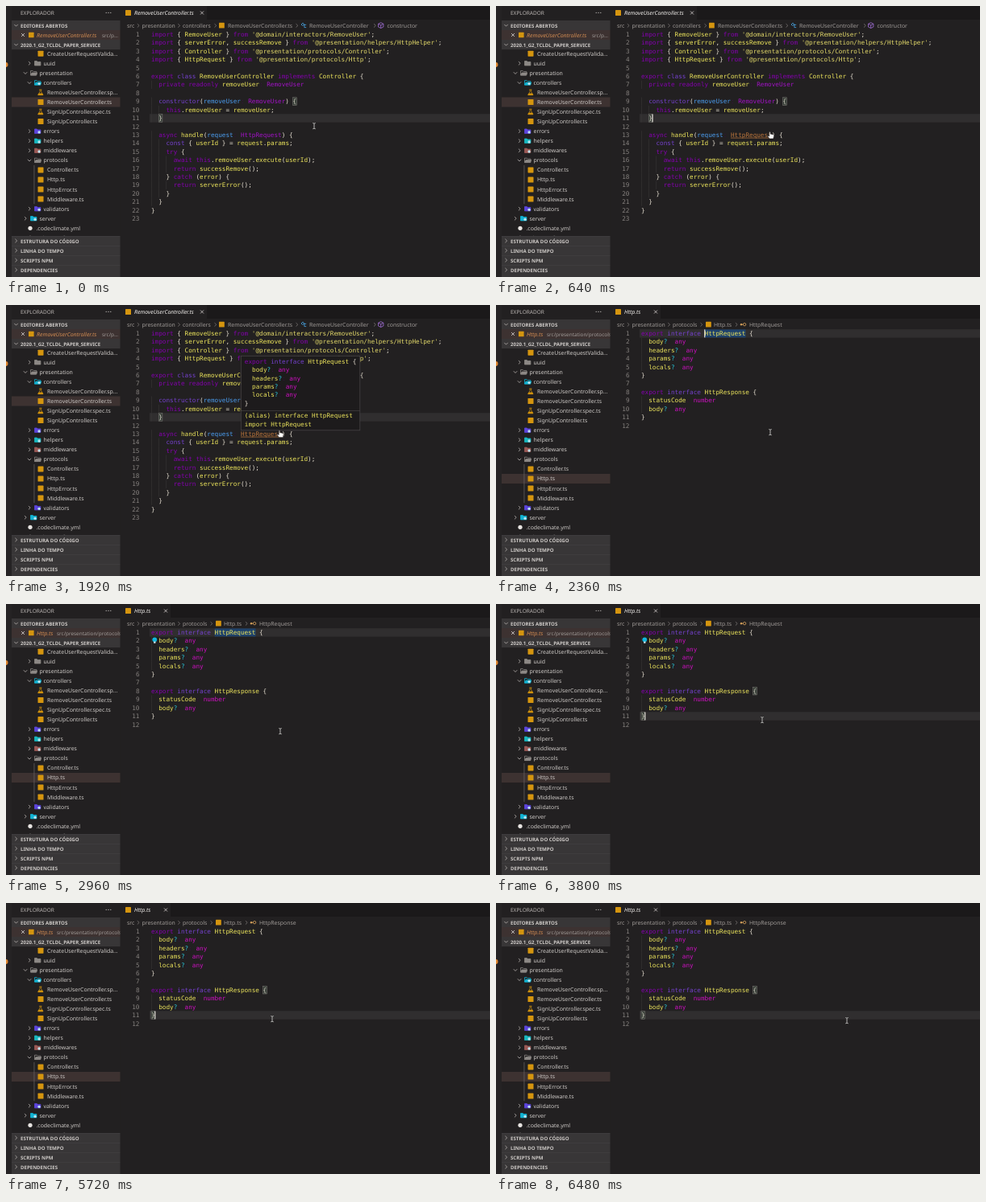
Write an HTML page that moves like this. It is 600 px wide and 337 px high and loops after 6520 ms.

```html
<!DOCTYPE html>
<html lang="pt">
<head>
<meta charset="utf-8">
<style>
html, body { margin: 0; width: 100%; height: 100%; overflow: hidden; background: #222021; }
svg { display: block; width: 600px; height: 337px; }
text { white-space: pre; text-rendering: geometricPrecision; }
.ui { font-family: "Noto Sans", "Open Sans", sans-serif; }
.code { font-family: "DejaVu Sans Mono", monospace; font-size: 7.68px; }
</style>
</head>
<body>
<svg id="stage" viewBox="0 0 600 337"></svg>
<script>
const LOOP = 6520;
const CHAR = 4.624, LINE = 10.41, LEFT = 180, TOP = 35.4;
const stage = document.getElementById('stage');

const C = {
  side: '#222021', strip: '#1b191a', head: '#383637', editor: '#222021', row: '#3d3231', band: '#302e2f',
  text: '#cfcbc8', dim: '#a09b98', orange: '#d5950f', grey: '#8d8986',
  keyword: '#8400ae', storage: '#7440cc', name: '#ece45c', type: '#a012c4', any: '#cc10c0',
  param: '#4b9df0', mark: '#e6dfd2', cyan: '#28c6dc', string: '#e3d96a', faint: '#38103f'
};

function add(parent, tag, attrs, content) {
  const node = document.createElementNS('http://www.w3.org/2000/svg', tag);
  for (const key in attrs) node.setAttribute(key, attrs[key]);
  if (content !== undefined) node.textContent = content;
  return parent.appendChild(node);
}
const group = parent => add(parent, 'g', {});
const rect = (p, x, y, width, height, fill, more) => add(p, 'rect', { x, y, width, height, fill, ...more });
const dot = (p, cx, cy, r, fill) => add(p, 'circle', { cx, cy, r, fill });
const path = (p, d, stroke, more) => add(p, 'path', { d, stroke, fill: 'none', 'stroke-width': 0.8, ...more });
const show = (node, on) => { node.style.display = on ? '' : 'none'; };

// Text is placed by the vertical middle of its row.
function label(p, x, y, content, fill = C.text, size = 6.9, more = {}) {
  return add(p, 'text', { class: 'ui', x, y: y + 2.5, fill, 'font-size': size, ...more }, content);
}
const italic = { 'font-style': 'italic' }, bold = { 'font-weight': 700 };

function chevron(p, x, y, open, color = '#b5b0ae') {
  const d = open ? `M${x - 2.2} ${y - 1.1}l2.2 2.3l2.2 -2.3` : `M${x - 1.1} ${y - 2.2}l2.3 2.2l-2.3 2.2`;
  path(p, d, color);
}
function cross(p, x, y) {
  path(p, `M${x - 2} ${y - 2}l4 4m0 -4l-4 4`, '#d8d4d2');
}
const square = (p, x, y, size = 7) => rect(p, x, y - size / 2, size, size, C.orange, { rx: 0.6 });

function flask(p, x, y) {
  path(p, `M${x + 2.2} ${y - 3.4}h3.2m-2.4 0v2.6l-2.3 4.1h6.2l-2.3 -4.1v-2.6`, C.orange, { 'stroke-width': 0.7 });
  path(p, `M${x + 1.6} ${y + 1.5}h4.4l.7 1.5h-5.8z`, C.orange, { fill: C.orange });
}
function folder(p, x, y, color, open) {
  path(p, `M${x} ${y - 2.7}h2.8l1 1h3.6v4.4h-7.4z`, color, { fill: open ? 'none' : color });
  if (open) path(p, `M${x} ${y + 2.7}l1.5 -3h6.6l-1.2 3z`, color, { fill: color });
  if (color !== C.grey) dot(p, x + 5.6, y + 1.2, 1.7, '#bfe3ee');
}

const palette = {};
const paint = (color, words) => words.split(' ').forEach(w => palette[w] = color);
paint(C.keyword, 'import from export private readonly implements async this try catch await return');
paint(C.storage, 'interface class const constructor');
paint(C.any, 'any number');
paint(C.cyan, '?');
paint(C.faint, ':');

// A tilde before a word marks a type, a caret a parameter.
function codeLine(p, x, y, source) {
  const node = add(p, 'text', { class: 'code', x, y: y + 2.6 });
  let link = null;
  for (const token of source.match(/'[^']*'|[~^]?\w+|\s+|[^\w\s]/g) || []) {
    const flag = token[0];
    let color = palette[token] || (/\w/.test(token) ? C.name : C.mark);
    if (flag === "'") color = C.string;
    if (flag === '~') color = C.type;
    if (flag === '^') color = C.param;
    const span = add(node, 'tspan', { fill: color }, token.replace(/^[~^]/, ''));
    if (token === '~HttpRequest') link = span;
  }
  return link;
}
const rowY = n => TOP + (n - 1) * LINE;
const colX = n => LEFT + n * CHAR;

function codeBlock(p, lines) {
  let link = null;
  lines.forEach((line, i) => {
    const y = rowY(i + 1);
    add(p, 'text', { class: 'code', x: 165.5, y: y + 2.6, fill: '#85807e', 'text-anchor': 'end' }, i + 1);
    const indent = line.search(/\S/);
    for (let c = 0; c < indent; c += 2) rect(p, colX(c), y - LINE / 2, 0.5, LINE, '#3b3839');
    link = codeLine(p, LEFT, y, line) || link;
  });
  return link;
}
const lineBand = (p, n) => rect(p, 178, rowY(n) - 5.2, 422, LINE, C.band);
const bracket = (p, line, col) => rect(p, colX(col), rowY(line) - 4.9, CHAR, 9.6, '#333b34',
  { stroke: '#85837f', 'stroke-width': 0.5 });
const caretAt = (p, line, col) => rect(p, colX(col) - 0.4, rowY(line) - 5, 1.1, 10, '#f4f0e8');

// Side bar
rect(stage, 0, 0, 142, 337, C.side);
rect(stage, 0, 0, 7, 337, '#252324');
dot(stage, -0.5, 73, 3, '#e0872f');
label(stage, 18, 8, 'EXPLORADOR', '#bdb8b6', 6.5);
for (let i = 0; i < 3; i++) dot(stage, 124.2 + i * 2.8, 8.3, 0.65, C.text);
rect(stage, 7, 30, 135, 12, C.row);

function section(y, name, open) {
  rect(stage, 7, y - 6, 135, 12.1, C.head);
  if (!open) rect(stage, 7, y - 6, 135, 0.5, '#454344');
  chevron(stage, 12.5, y, open);
  label(stage, 18, y, name, C.text, 6.1, bold);
}
section(24, 'EDITORES ABERTOS', true);
section(48, '2020.1_G2_TCLDL_PAPER_SERVICE', true);

const picked = rect(stage, 7, 0, 135, 12.05, C.row);

// Each entry: kind, indent, name, colour
const tree = [
  ['ts', 39, 'CreateUserRequestValida...'],
  ['shut', 29, 'uuid', C.grey],
  ['open', 24, 'presentation', C.grey],
  ['open', 29, 'controllers', '#12b4d4'],
  ['test', 39, 'RemoveUserController.sp...'],
  ['ts', 39, 'RemoveUserController.ts'],
  ['test', 39, 'SignUpController.spec.ts'],
  ['ts', 39, 'SignUpController.ts'],
  ['shut', 29, 'errors', '#5c45dd'],
  ['shut', 29, 'helpers', '#18b8c0'],
  ['shut', 29, 'middlewares', '#9c5a56'],
  ['open', 29, 'protocols', C.grey],
  ['ts', 39, 'Controller.ts'],
  ['ts', 39, 'Http.ts'],
  ['ts', 39, 'HttpError.ts'],
  ['ts', 39, 'Middleware.ts'],
  ['shut', 29, 'validators', '#5c45dd'],
  ['shut', 24, 'server', '#12b4d4'],
  ['plain', 27, '.codeclimate.yml'],
  ['plain', 27, '.editorconfig']
];
const treeY = i => 59.2 + i * 12.06;
rect(stage, 34.6, treeY(12) - 6, 0.7, 12.06 * 4, '#6b6867');
tree.forEach(([kind, x, name, color], i) => {
  const y = treeY(i);
  if (kind === 'ts') square(stage, x + 0.5, y);
  if (kind === 'test') flask(stage, x, y);
  if (kind === 'plain') dot(stage, 30, y, 2.6, '#e8e5e2');
  if (color) {
    chevron(stage, x, y, kind === 'open');
    folder(stage, x + 6.5, y, color, kind === 'open');
  }
  label(stage, color ? x + 17.5 : x + (kind === 'plain' ? 10.5 : 12), y, name);
});
rect(stage, 7, 286, 135, 51, C.head);
['ESTRUTURA DO CÓDIGO', 'LINHA DO TEMPO', 'SCRIPTS NPM', 'DEPENDENCIES']
  .forEach((name, i) => section(292 + i * 12.05, name, false));

// One open file: side bar row, tab and path bar
function fileView(name, where, whereX, tabEnd) {
  const g = group(stage);
  cross(g, 21, 36);
  square(g, 28, 36, 6.6);
  label(g, 38, 36, name, '#d18b52', 6.9, italic);
  label(g, whereX, 36, where, C.dim, 6.4);
  rect(g, 141.5, 0, 459, 337, C.editor);
  rect(g, tabEnd + 6, 0, 600, 17, C.strip);
  square(g, 148, 8.5);
  label(g, 159, 8.3, name, '#f4f1ee', 6.85, italic);
  cross(g, tabEnd, 8.5);
  return g;
}
function crumbs(p, items) {
  items.forEach(([x, name], i) => {
    label(p, x, 24.2, name, C.dim);
    if (i) chevron(p, x - (i < 3 ? 4.6 : 15.4), 24.4, false, '#7d7876');
  });
}

const first = fileView('RemoveUserController.ts', 'src/p...', 119, 243);
crumbs(first, [[150, 'src'], [168.5, 'presentation'], [219, 'controllers'],
  [275, 'RemoveUserController.ts'], [376, 'RemoveUserController'], [472.5, 'constructor']]);
square(first, 264, 24.2, 6.8);
path(first, 'M366 23l2 -2l1.6 1.6l-2 2zm2.8 .4h3.4m-2.4 0v3.2h2.4', '#4aa8e8');
path(first, 'M461.5 22.3l3.2 -1.6l3.2 1.6v3.7l-3.2 1.6l-3.2 -1.6zl3.2 1.6l3.2 -1.6m-3.2 1.6v3.7', '#a36fd8');
lineBand(first, 11);
bracket(first, 9, 38);
bracket(first, 11, 2);
const link = codeBlock(first, [
  "import { RemoveUser } from '@domain/interactors/RemoveUser';",
  "import { serverError, successRemove } from '@presentation/helpers/HttpHelper';",
  "import { Controller } from '@presentation/protocols/Controller';",
  "import { HttpRequest } from '@presentation/protocols/Http';",
  '',
  'export class RemoveUserController implements Controller {',
  '  private readonly removeUser: ~RemoveUser',
  '',
  '  constructor(^removeUser: ~RemoveUser) {',
  '    this.removeUser = removeUser;',
  '  }',
  '',
  '  async handle(^request: ~HttpRequest) {',
  '    const { userId } = request.params;',
  '    try {',
  '      await this.removeUser.execute(userId);',
  '      return successRemove();',
  '    } catch (error) {',
  '      return serverError();',
  '    }',
  '  }',
  '}',
  ''
]);
const underline = rect(first, colX(24), rowY(13) + 3.4, 11 * CHAR, 0.7, '#b9743c');
const firstCaret = caretAt(first, 11, 3);

const requestShape = ['export interface HttpRequest {', '  body?: any', '  headers?: any',
  '  params?: any', '  locals?: any', '}'];
const popup = group(first);
rect(popup, 291.3, 63.3, 147.5, 92.5, '#1d1b1c', { stroke: '#4b4849', 'stroke-width': 0.7 });
rect(popup, 291.3, 131, 147.5, 0.6, '#4b4849');
requestShape.forEach((line, i) => codeLine(popup, 295.8, 70.3 + i * 10.35, line));
// The alias note is one plain colour.
['(alias) interface HttpRequest', 'import HttpRequest'].forEach((note, i) =>
  add(popup, 'text', { class: 'code', x: 295.8, y: 140.4 + i * 10.3, fill: C.name }, note));

const second = fileView('Http.ts', 'src/presentation/protocols', 63, 198);
crumbs(second, [[150, 'src'], [168.5, 'presentation'], [219, 'protocols'], [270, 'Http.ts']]);
chevron(second, 298, 24.4, false, '#7d7876');
square(second, 260, 24.2, 6.8);
dot(second, 304, 24.2, 1.2, '#d8a25c');
path(second, 'M305 24.2h1.4a1.7 1.7 0 1 1 3.4 0a1.7 1.7 0 1 1 -3.4 0', '#d8a25c');
const crumbName = label(second, 314, 24.2, 'HttpRequest', C.dim);
const selected = group(second);
lineBand(selected, 1);
rect(selected, colX(17), rowY(1) - 5, 11 * CHAR, 10, '#1f426b');
const matched = group(second);
lineBand(matched, 11);
bracket(matched, 8, 30);
bracket(matched, 11, 0);
codeBlock(second, [
  ...requestShape,
  '',
  'export interface HttpResponse {',
  '  statusCode: number',
  '  body?: any',
  '}',
  ''
]);
const bulb = group(second);
dot(bulb, 184.3, 44.3, 2.9, '#12b6dc');
rect(bulb, 183.1, 46.6, 2.4, 2.2, '#c9dfe4');
const nameCaret = caretAt(second, 1, 17);
const endCaret = caretAt(second, 11, 1);

// Pointers
const beam = group(stage);
const beamPath = 'M-1.7 -3.4q1.7 0 1.7 .8v5.6q0 .8 -1.7 .8m3.4 -7.2q-1.7 0 -1.7 .8m0 5.6q0 .8 1.7 .8';
path(beam, beamPath, '#111', { 'stroke-width': 1.7 });
path(beam, beamPath, '#f4f2f0', { 'stroke-width': 0.8 });
const hand = group(stage);
path(hand, 'M-1.8 -4q1.3 -.7 1.5 .6v2l3.4 .6q1.2 .4 1 1.8l-.7 3.6h-4.8l-2.4 -3q-.4 -1.4 1.2 -.7l.8 .6z', '#161415',
  { fill: '#fbfaf8', 'stroke-width': 0.6 });

// Time, x, y
const route = [[0, 382, 149], [80, 382, 149], [480, 341, 160.5], [800, 340, 160.5], [2200, 340, 160],
  [2320, 340, 158], [2960, 340, 158], [3320, 330, 144], [6150, 330, 144], [6480, 435, 146], [LOOP, 435, 146]];
function pointer(t) {
  const i = route.findIndex(stop => stop[0] > t);
  const [t0, x0, y0] = route[i - 1], [t1, x1, y1] = route[i];
  const k = (t - t0) / (t1 - t0), e = k * k * (3 - 2 * k);
  return `translate(${x0 + (x1 - x0) * e} ${y0 + (y1 - y0) * e})`;
}

const OPEN = 2140, CLICK = 3600, SETTLE = 3960;
const blink = (t, start) => t >= start && (t - start) % 1000 < 500;

function draw(t) {
  const opened = t >= OPEN, clicked = t >= CLICK, linked = t >= 480 && !opened;
  show(first, !opened);
  show(second, opened);
  picked.setAttribute('y', treeY(opened ? 13 : 5) - 6);
  link.setAttribute('fill', linked ? '#b9743c' : C.type);
  show(underline, linked);
  show(popup, t >= 1000);
  show(firstCaret, blink(t, 400));
  show(selected, !clicked);
  show(matched, clicked);
  show(nameCaret, !clicked && blink(t, OPEN));
  show(endCaret, clicked && blink(t, CLICK));
  show(bulb, t >= 2600 && t < SETTLE);
  crumbName.textContent = t < SETTLE ? 'HttpRequest' : 'HttpResponse';
  show(hand, linked);
  show(beam, !linked);
  const place = pointer(t);
  hand.setAttribute('transform', place);
  beam.setAttribute('transform', place);
}

const began = performance.now();
function tick() {
  draw((performance.now() - began) % LOOP);
  requestAnimationFrame(tick);
}
draw(0);
requestAnimationFrame(tick);
</script>
</body>
</html>
```
